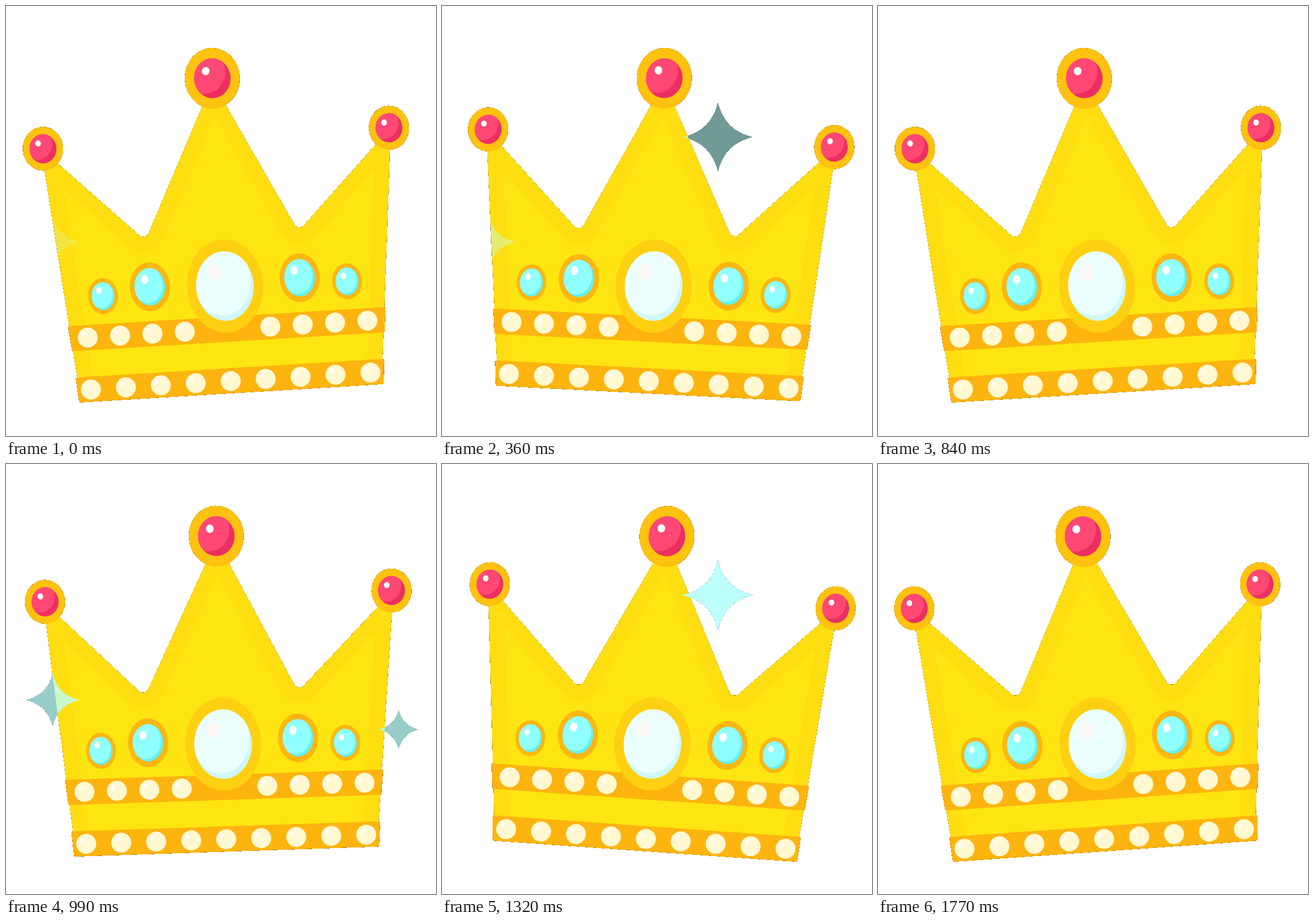
An HTML page with a canvas that plays this animation: 748 px wide and 748 px high, repeating every 1800 ms.

```html
<!DOCTYPE html>
<html lang="en">
<head>
<meta charset="utf-8">
<title>Crown</title>
<style>
html, body { margin: 0; width: 100%; height: 100%; overflow: hidden; background: #fff; }
canvas { display: block; }
</style>
</head>
<body>
<canvas id="stage" width="748" height="748"></canvas>
<script>
const SIZE = 748, MID = SIZE / 2, STEP = 30, PERIOD = 900;
const ctx = document.getElementById('stage').getContext('2d', { willReadFrequently: true });

function oval(x, y, rx, ry, color) {
  ctx.fillStyle = color;
  ctx.beginPath();
  ctx.ellipse(x, y, rx, ry, 0, 0, 2 * Math.PI);
  ctx.fill();
}

// A stone: shaded base, lit oval shifted up and left inside it, small highlight.
function stone(x, y, rx, ry, look) {
  oval(x, y, rx, ry, look.dark);
  ctx.save();
  ctx.beginPath();
  ctx.ellipse(x, y, rx, ry, 0, 0, 2 * Math.PI);
  ctx.clip();
  oval(x - look.dx * rx, y - look.dy * ry, rx * look.grow, ry * look.grow, look.light);
  ctx.restore();
  oval(x - look.hx * rx, y - look.hy * ry, rx * look.spot, ry * look.spot, look.shine);
}

const RUBY = { dark: '#ec2f62', light: '#ff4873', shine: '#fff',
  dx: .4, dy: .38, grow: 1.13, hx: .34, hy: .38, spot: .21 };
const AQUA = { dark: '#64f0f0', light: '#90fffd', shine: '#fff',
  dx: .15, dy: .13, grow: 1, hx: .32, hy: .41, spot: .24 };
const PEARL = { dark: '#d0f7fd', light: '#ebfffe', shine: '#fcf8f7',
  dx: .09, dy: .16, grow: 1, hx: .32, hy: .41, spot: .24 };

function body() {
  ctx.beginPath();
  ctx.moveTo(0, 131.5);
  ctx.arcTo(133.4, 400, 305, 229, 10);
  ctx.lineTo(305, 229);
  ctx.lineTo(262, 674);
  ctx.lineTo(-262, 674);
  ctx.lineTo(-305, 229);
  ctx.arcTo(-133.4, 400, 0, 131.5, 10);
  ctx.closePath();
  ctx.fillStyle = '#fee511';
  ctx.fill();
  // Inner rim only
  ctx.globalCompositeOperation = 'source-atop';
  ctx.strokeStyle = '#fedd11';
  ctx.lineWidth = 54;
  ctx.stroke();
  ctx.globalCompositeOperation = 'source-over';
}

function band(y, top, bottom) {
  const r = 3, h = 44;
  ctx.beginPath();
  ctx.moveTo(0, y);
  ctx.arcTo(top, y, bottom, y + h, r);
  ctx.arcTo(bottom, y + h, 0, y + h, r);
  ctx.arcTo(-bottom, y + h, -top, y, r);
  ctx.arcTo(-top, y, 0, y, r);
  ctx.closePath();
  ctx.fillStyle = '#feb40e';
  ctx.fill();
}

function bead(x, y) {
  oval(x, y, 17.4, 17.4, '#fff8d0');
  oval(x - 6.5, y - 6.5, 4.2, 4.2, '#fffdf2');
}

function crown(angle) {
  ctx.save();
  ctx.translate(MID, MID);
  ctx.rotate(angle * Math.PI / 180);
  ctx.translate(0, -MID);
  body();
  band(540.5, 277, 272.5);
  band(630.5, 269, 265.5);
  for (let i = 0; i < 4; i++)
    for (const side of [-1, 1]) bead(side * (74.5 + 56.4 * i), 562.4);
  for (let i = -4; i <= 4; i++) bead(60.9 * i, 652.9);

  oval(0, 487.3, 66.3, 81, '#fed011');
  stone(0, 487.3, 50, 60.5, PEARL);
  for (const side of [-1, 1]) {
    oval(side * 130.5, 480.7, 35, 42.5, '#feb612');
    stone(side * 130.5, 480.7, 26.7, 32.5, AQUA);
    oval(side * 212.7, 492, 26, 31.5, '#feb612');
    stone(side * 212.7, 492, 20, 24.2, AQUA);
    oval(side * 301.5, 229.8, 35.2, 38.4, '#ffc20e');
    stone(side * 301.5, 229.8, 23.4, 25.4, RUBY);
  }
  oval(0, 125.3, 48, 53, '#ffc20e');
  stone(0, 125.3, 31.8, 34.7, RUBY);
  ctx.restore();
}

function sparkle(x, y, r, alpha) {
  const c = .18 * r;
  ctx.globalAlpha = alpha;
  ctx.fillStyle = '#bdfffb';
  ctx.beginPath();
  ctx.moveTo(x, y - r);
  ctx.quadraticCurveTo(x + c, y - c, x + r, y);
  ctx.quadraticCurveTo(x + c, y + c, x, y + r);
  ctx.quadraticCurveTo(x - c, y + c, x - r, y);
  ctx.quadraticCurveTo(x - c, y - c, x, y - r);
  ctx.fill();
  ctx.globalAlpha = 1;
}

// Fade in, hold and fade out, 150 ms each.
function glow(t, start) {
  const age = (t - start + PERIOD) % PERIOD;
  return Math.max(0, Math.min(1, age / 150, (450 - age) / 150));
}

// One-bit transparency: faint pixels vanish, the rest darken by their alpha.
function harden() {
  const img = ctx.getImageData(0, 0, SIZE, SIZE), d = img.data;
  for (let i = 0; i < d.length; i += 4) {
    const a = d[i + 3];
    if (a === 0 || a === 255) continue;
    for (let k = 0; k < 3; k++) d[i + k] *= a / 255;
    d[i + 3] = a < 128 ? 0 : 255;
  }
  ctx.putImageData(img, 0, 0);
}

function draw() {
  const t = Math.floor(performance.now() / STEP) * STEP % PERIOD;
  const phase = (t + STEP) % PERIOD / PERIOD;
  ctx.clearRect(0, 0, SIZE, SIZE);
  crown(4 - 16 * Math.abs(phase - .5));
  sparkle(81, 410.5, 47, glow(t, 870));
  sparkle(683, 462, 35.5, glow(t, 870));
  sparkle(480, 228, 62, glow(t, 270));
  harden();
  requestAnimationFrame(draw);
}
draw();
</script>
</body>
</html>
```
